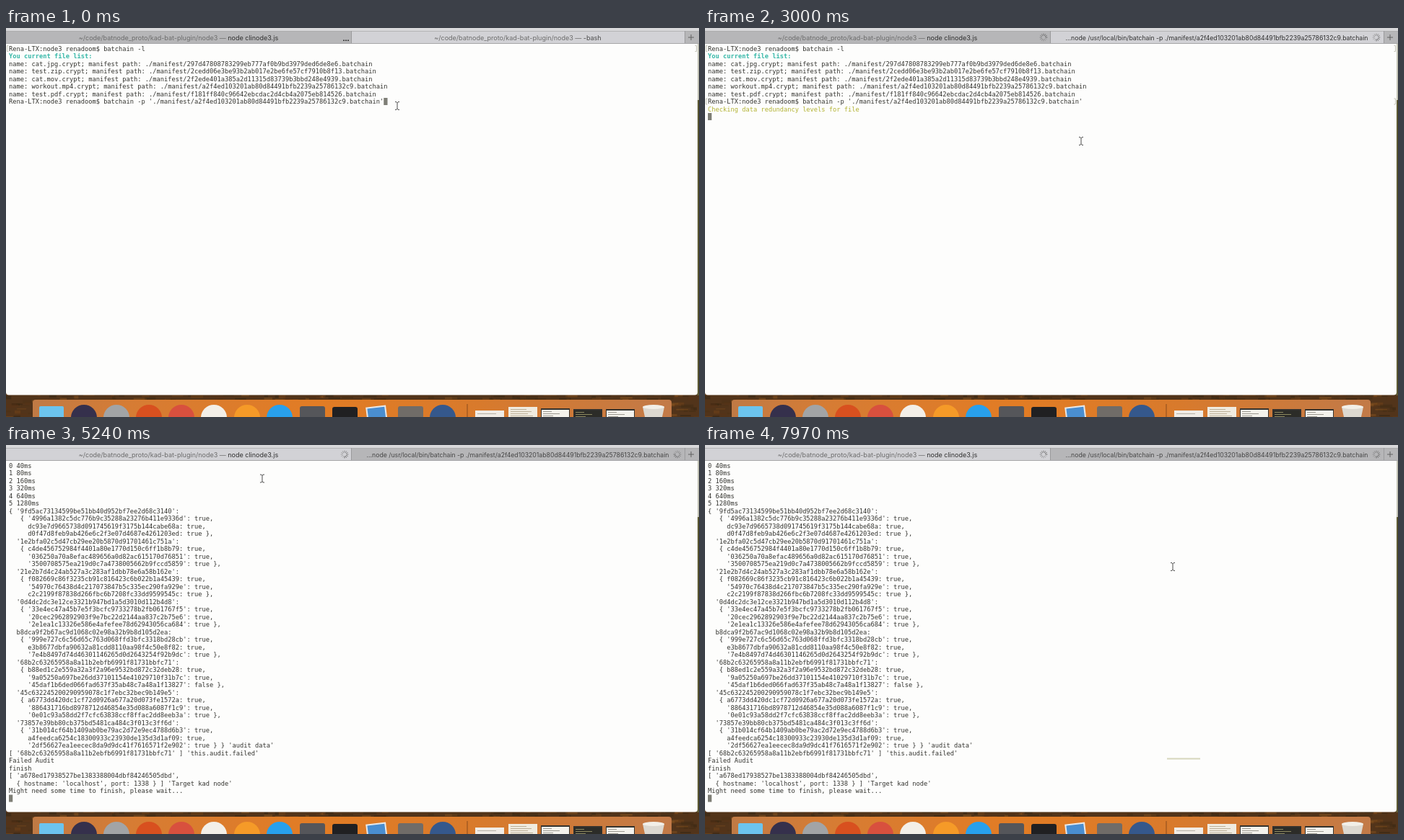
An HTML page with a canvas that plays this animation: 960 px wide and 540 px high, repeating every 8000 ms.

```html
<!DOCTYPE html>
<html lang="en">
<head>
<meta charset="utf-8">
<title>Terminal session</title>
<style>
html, body { margin: 0; width: 100%; height: 100%; overflow: hidden; background: #fdfdfc; }
canvas { display: block; width: 100vw; height: 100vh; }
</style>
</head>
<body>
<canvas id="stage" width="960" height="540"></canvas>
<script>
const W = 960, H = 540, LOOP = 8000;
const RUN_AT = 600, REPORT_AT = 3400, SWITCH_AT = 4970;
const COL = 5.245, ROW = 10.5, LEFT = 4, TOP = 28.5;
const INK = '#33332f', PAPER = '#fdfdfc';

const ctx = document.getElementById('stage').getContext('2d');

// ---------- terminal text ----------
const PROMPT = 'Rena-LTX:node3 renadoom$ ';
const WORKOUT = 'a2f4ed103201ab80d84491bfb2239a25786132c9';
const FAILED = '68b2c63265958a8a11b2ebfb6991f81731bbfc71';

const files = [
  ['cat.jpg', '297d47808783299eb777af0b9bd3979ded6de8e6'],
  ['test.zip', '2cedd06e3be93b2ab017e2be6fe57cf7910b8f13'],
  ['cat.mov', '2f2ede401a385a2d11315d83739b3bbd248e4939'],
  ['workout.mp4', WORKOUT],
  ['test.pdf', 'f181ff840c96642ebcdac2d4cb4a2075eb814526']
];

// Each shard id is followed by the ids of its three copies.
const shards = `
9fd5ac73134599be51bb40d952bf7ee2d68c3140 4996a1382c5dc776b9c35288a23276b411e9336d dc93e7d9665738d091745619f3175b144cabe68a d0f47d8feb9ab426e6c2f3e07d4687e4261203ed
1e2bfa02c5d47cb29ee20b5870d91701461c751a c4de456752984f4401a80e1770d150c6ff1b8b79 036250a70a8efac489656a0d82ac615170d76851 3500708575ea219d0c7a4738005662b9fccd5859
21e2b7d4c24ab527a3c283af1dbb78e6a58b162e f082669c86f3235cb91c816423c6b022b1a45439 54970c76438d4c217073847b5c335ec290fa929e c2c2199f87838d266fbc6b7208fc33dd9599545c
0d4dc2dc3e12ce3321b947bd1a5d3010d112b4d8 33e4ec47a45b7e5f3bcfc9733278b2fb061767f5 20cec2962892903f9e7bc22d2144aa837c2b75e6 2e1ea1c13326e586e4afefee78d62943056ca684
b8dca9f2b67ac9d1068c02e98a32b9b8d105d2ea 999e727c6c56d65c763d068ffd3bfc3318bd28cb e3b8677dbfa90632a81cdd8110aa98f4c50e8f82 7e4b8497d74d46301146265d0d2643254f92b9dc
68b2c63265958a8a11b2ebfb6991f81731bbfc71 b88ed1c2e559a32a3f2a96e9532bd872c32deb28 9a05250a697be26dd37101154e41029710f31b7c 45daf1b6ded066fad637f35ab48c7a48a1f13827
45c632245200290959078c1f7ebc32bec9b149e5 a6773dd420dc1cf72d0926a677a20d073fe1572a 886431716bd8978712d46854e35d088a6087f1c9 0e01c93a58dd2f7cfc63838ccf8ffac2dd8eeb3a
73857e39bb80cb375bd5481ca484c3f013c3ff6d 31b014cf64b1409ab0be79ac2d72e9ec4788d6b3 a4feedca6254c18300933c23930de135d3d1af09 2df56627ea1eecec8da9d9dc41f7616571f2e902
`.trim().split('\n').map(line => line.split(' '));

const key = id => /^\d/.test(id) ? `'${id}'` : id;
const [sibling, spare, lost] = shards.find(s => s[0] === FAILED).slice(1);

const listing = [
  PROMPT + 'batchain -l',
  { text: 'You current file list:', color: '#36b8a8', bold: true },
  ...files.map(([name, id]) => `name: ${name}.crypt; manifest path: ./manifest/${id}.batchain`),
  `${PROMPT}batchain -p './manifest/${WORKOUT}.batchain'`
];

const checking = [
  ...listing,
  { text: 'Checking data redundancy levels for file', color: '#b2b232' }
];

const report = [
  ...checking,
  'File name: workout.mp4.crypt | Baseline data redundancy: false',
  ...shards.map(([id]) =>
    `|  ${id}  |  copies of this shard on the network that are retrievable:  ${id === FAILED ? 2 : 3}`),
  `[ '${FAILED}' ] 'failed shaIds'`,
  `failed sha from forEach loop ${FAILED}`,
  `findRedundantShard - auditData[failedSha] { ${sibling}: true,`,
  `  '${spare}': true,`,
  `  '${lost}': false }`,
  "sendPatchMessage - message:  { messageType: 'CLI_PATCH_FILE',",
  `  manifestPath: './manifest/${WORKOUT}.batchain',`,
  `  failedShaId: '${FAILED}',`,
  `  siblingShardId: '${sibling}',`,
  `  copiesToRemoveFromManifest: [ '${lost}' ] }`
];

const audit = [
  ...[40, 80, 160, 320, 640, 1280].map((ms, i) => `${i} ${ms}ms`),
  ...shards.flatMap(([id, ...copies], s) => [
    `${s ? ' ' : '{'} ${key(id)}:`,
    ...copies.map((copy, c) => {
      const end = c < 2 ? ',' : s < 7 ? ' },' : " } } 'audit data'";
      return `   ${c ? ' ' : '{'} ${key(copy)}: ${copy !== lost}${end}`;
    })
  ]),
  `[ '${FAILED}' ] 'this.audit.failed'`,
  'Failed Audit',
  'finish',
  "[ 'a678ed17938527be1383388004dbf84246505dbd',",
  "  { hostname: 'localhost', port: 1338 } ] 'Target kad node'",
  'Might need some time to finish, please wait...'
];

// ---------- drawing helpers ----------
function rect(c, x, y, w, h, color) {
  c.fillStyle = color;
  c.fillRect(x, y, w, h);
}

function round(c, x, y, w, h, r, color) {
  c.fillStyle = color;
  c.beginPath();
  c.roundRect(x, y, w, h, r);
  c.fill();
}

function disc(c, x, y, r, color) {
  c.fillStyle = color;
  c.beginPath();
  c.arc(x, y, r, 0, 7);
  c.fill();
}

function stroke(c, color, width, points) {
  c.strokeStyle = color;
  c.lineWidth = width;
  c.beginPath();
  points.forEach(([x, y], i) => i ? c.lineTo(x, y) : c.moveTo(x, y));
  c.stroke();
}

function layer(draw) {
  const canvas = document.createElement('canvas');
  canvas.width = W;
  canvas.height = H;
  draw(canvas.getContext('2d'));
  return canvas;
}

// ---------- wallpaper and dock ----------
function seeded(seed) {
  return () => (seed = (seed * 16807) % 2147483647) / 2147483647;
}

function miniWindow(c, x, y, body, line) {
  rect(c, x, y, 40, 20, '#34322e');
  rect(c, x + 1, y + 2, 38, 20, body);
  for (let i = 0; i < 4; i++) rect(c, x + 3, y + 4 + i * 3, 12 + (i * 11) % 20, 1, line);
}

function drawDock(c) {
  const rnd = seeded(77);
  const tones = ['#2c2110', '#5a3414', '#7c4818', '#3a2a12', '#935a1e', '#4a3014'];
  rect(c, 0, 500, W, 40, '#52341a');
  for (let i = 0; i < 420; i++) {
    c.globalAlpha = 0.4;
    rect(c, rnd() * W - 6, 506 + rnd() * 34, 4 + rnd() * 14, 1 + rnd() * 4, tones[i % 6]);
  }
  c.globalAlpha = 1;
  rect(c, 957, 22, 3, 78, '#c4c4b6');
  rect(c, 957, 100, 3, 410, '#5e5a34');

  const glass = c.createLinearGradient(37, 0, 922, 0);
  glass.addColorStop(0, '#c07a45');
  glass.addColorStop(0.15, '#d67c34');
  glass.addColorStop(0.45, '#e27c24');
  glass.addColorStop(0.7, '#d87a2c');
  glass.addColorStop(1, '#c27a48');
  round(c, 37, 516, 885, 40, 4, glass);

  round(c, 46, 525, 34, 30, 2, '#6cc4ee');
  [
    [108, '#35304c'], [153, '#a2a4a6'], [198, '#d8501f'], [243, '#d8503e'],
    [288, '#f3efe8'], [334, '#f59a28'], [379, '#28a0ec'], [605, '#35588c']
  ].forEach(([x, color]) => disc(c, x, 541, 18, color));
  round(c, 407, 525, 35, 30, 3, '#55565a');
  round(c, 452, 526, 35, 30, 3, '#202022');
  c.save();
  c.translate(514, 541);
  c.rotate(-0.12);
  rect(c, -14, -16, 28, 34, '#e8e8e8');
  rect(c, -12, -14, 24, 34, '#4a8ed0');
  c.restore();
  round(c, 543, 525, 35, 30, 3, '#706c68');

  rect(c, 638.5, 522, 1, 18, '#8a4a1c');
  rect(c, 650, 531, 40, 10, '#f0ece6');
  rect(c, 653, 535, 26, 1, '#b5b0a6');
  rect(c, 696, 526, 40, 14, '#f0ebe0');
  for (let i = 0; i < 4; i++) rect(c, 699, 529 + i * 3, 22 + (i * 7) % 12, 1, '#bcb098');
  miniWindow(c, 741, 528, '#f4f2ec', '#9b9890');
  miniWindow(c, 786, 529, '#2c2c28', '#8c8860');
  miniWindow(c, 831, 529, '#f4f2ec', '#9b9890');

  c.fillStyle = '#dcd8d0';
  c.beginPath();
  c.moveTo(882, 526);
  c.lineTo(912, 526);
  c.lineTo(909, 540);
  c.lineTo(885, 540);
  c.fill();
  c.fillStyle = '#f2efe8';
  c.beginPath();
  c.ellipse(897, 526, 15, 3, 0, 0, 7);
  c.fill();

  round(c, 0, 16, 958, 493.5, 4, PAPER);
}

// ---------- terminal pages ----------
function drawLines(c, lines) {
  const scale = COL / 0.60205 / 40;
  lines.forEach((entry, row) => {
    const { text, color = INK, bold } = entry.text ? entry : { text: entry };
    c.save();
    c.translate(LEFT, TOP + row * ROW + 3);
    c.scale(scale, scale);
    c.font = `${bold ? 'bold ' : ''}40px "DejaVu Sans Mono", monospace`;
    c.fillStyle = color;
    c.fillText(text, 0, 0);
    c.restore();
  });
}

function drawMarks(c, row) {
  const y = TOP + row * ROW;
  stroke(c, '#b4b4a4', 0.8, [[3.2, y - 4], [1.6, y - 4], [1.6, y + 4], [3.2, y + 4]]);
  stroke(c, '#b4b4a4', 0.8, [[954.5, y - 4], [956.5, y - 4], [956.5, y + 4], [954.5, y + 4]]);
}

const page = (lines, marks) => layer(c => {
  drawLines(c, lines);
  marks.forEach(row => drawMarks(c, row));
});

const desk = layer(drawDock);
const pages = {
  idle: page(listing, [0]),
  checking: page(checking, [0, 7]),
  report: page(report, [0, 7]),
  audit: page(audit, [])
};

// ---------- tab bar ----------
function label(parts, centre, size = 9) {
  ctx.font = `${size}px Inter, "Open Sans", sans-serif`;
  const widths = parts.map(([text]) => ctx.measureText(text).width);
  let x = centre - widths.reduce((a, b) => a + b) / 2;
  parts.forEach(([text, color], i) => {
    ctx.fillStyle = color;
    ctx.fillText(text, x, 16.5);
    x += widths[i];
  });
}

function spinner(x, y, t, color) {
  const head = Math.floor(t / 83) % 12;
  ctx.lineCap = 'round';
  for (let i = 0; i < 12; i++) {
    const a = i * Math.PI / 6, cos = Math.cos(a), sin = Math.sin(a);
    ctx.globalAlpha = 1 - ((head - i + 12) % 12) / 16;
    stroke(ctx, color, 0.9, [[x + cos * 2.8, y + sin * 2.8], [x + cos * 5, y + sin * 5]]);
  }
  ctx.globalAlpha = 1;
  ctx.lineCap = 'butt';
}

function drawTabs(t) {
  const onLeft = t >= SWITCH_AT, running = t >= RUN_AT;
  const active = '#d2d2d6', inactive = '#b6b6b8';
  rect(ctx, 0, 0, W, 22, inactive);
  rect(ctx, 0, 0, W, 4, '#d8d8da');
  rect(ctx, onLeft ? 0 : 479, 4, onLeft ? 478 : 461, 18, active);
  rect(ctx, 0, 4, W, 0.7, '#a8a8aa');
  rect(ctx, 478, 4, 1, 18, '#9a9a9c');
  rect(ctx, 940, 4, 1, 18, '#9a9a9c');
  rect(ctx, 0, 21, W, 1, '#a6a6a8');

  const soft = '#6c6c6c', dark = '#303030';
  const folder = '~/code/batnode_proto/kad-bat-plugin/node3 — ';
  label([[folder, soft], ['node clinode3.js', dark]], 239);
  if (running) {
    const command = `...node /usr/local/bin/batchain -p ./manifest/${WORKOUT}.batchain`;
    label([[command, onLeft ? '#464646' : dark]], 709, 8.7);
    spinner(469, 13, t, '#606060');
    spinner(930, 13, t + 300, '#606060');
  } else {
    label([[folder, soft], ['-bash', '#4c4c4c']], 709);
    for (let i = 0; i < 3; i++) rect(ctx, 467 + i * 3, 16.5, 2, 1.5, '#3a3a3a');
  }
  stroke(ctx, '#606060', 1, [[945, 13], [953, 13]]);
  stroke(ctx, '#606060', 1, [[949, 9], [949, 17]]);
}

// ---------- pointer ----------
const path = [
  [0, 542, 108], [650, 542, 108], [1400, 476, 298], [2350, 476, 298],
  [3000, 521, 157], [3250, 521, 157], [3900, 633, 70], [4150, 633, 70],
  [4800, 320, 7], [5050, 320, 7], [5850, 563, 282], [6900, 563, 282],
  [7700, 648, 169], [LOOP, 648, 169]
];

function pointerAt(t) {
  const i = path.findIndex(p => p[0] > t);
  const [t0, x0, y0] = path[i - 1], [t1, x1, y1] = path[i];
  const u = (t - t0) / (t1 - t0), e = u * u * (3 - 2 * u);
  return [x0 + (x1 - x0) * e, y0 + (y1 - y0) * e];
}

function drawArrow(x, y) {
  ctx.beginPath();
  [[0, -5], [0, 6], [2.5, 3.8], [4, 7], [5.6, 6.3], [4.2, 3.2], [7.2, 3]]
    .forEach(([dx, dy]) => ctx.lineTo(x + dx, y + dy));
  ctx.closePath();
  ctx.strokeStyle = '#f4f4f4';
  ctx.lineWidth = 1.2;
  ctx.stroke();
  ctx.fillStyle = '#151515';
  ctx.fill();
}

function drawBeam(x, y) {
  const c = '#4c4c4c';
  stroke(ctx, c, 1, [[x, y - 4.5], [x, y + 4.5]]);
  for (const s of [-1, 1]) {
    stroke(ctx, c, 1, [[x - 3, y + s * 5.5], [x - 1, y + s * 5.3], [x, y + s * 4.2],
      [x + 1, y + s * 5.3], [x + 3, y + s * 5.5]]);
  }
}

// ---------- main loop ----------
function sceneAt(t) {
  if (t < RUN_AT) return [pages.idle, 7, 99];
  if (t < REPORT_AT) return [pages.checking, checking.length, 0];
  if (t < SWITCH_AT) return [pages.report, report.length, 0];
  return [pages.audit, audit.length, 0];
}

function frame(now) {
  const t = now % LOOP;
  const [view, row, col] = sceneAt(t);
  ctx.drawImage(desk, 0, 0);
  drawTabs(t);
  ctx.drawImage(view, 0, 0);
  rect(ctx, LEFT + col * COL, TOP + row * ROW - 5, COL, 10, '#7e7e76');
  if (t > 7600) rect(ctx, 640, 434.5, 46, 2, '#d6d6bc');

  const [x, y] = pointerAt(t);
  (y < 22 ? drawArrow : drawBeam)(x, y);
  requestAnimationFrame(frame);
}

requestAnimationFrame(frame);
</script>
</body>
</html>
```
